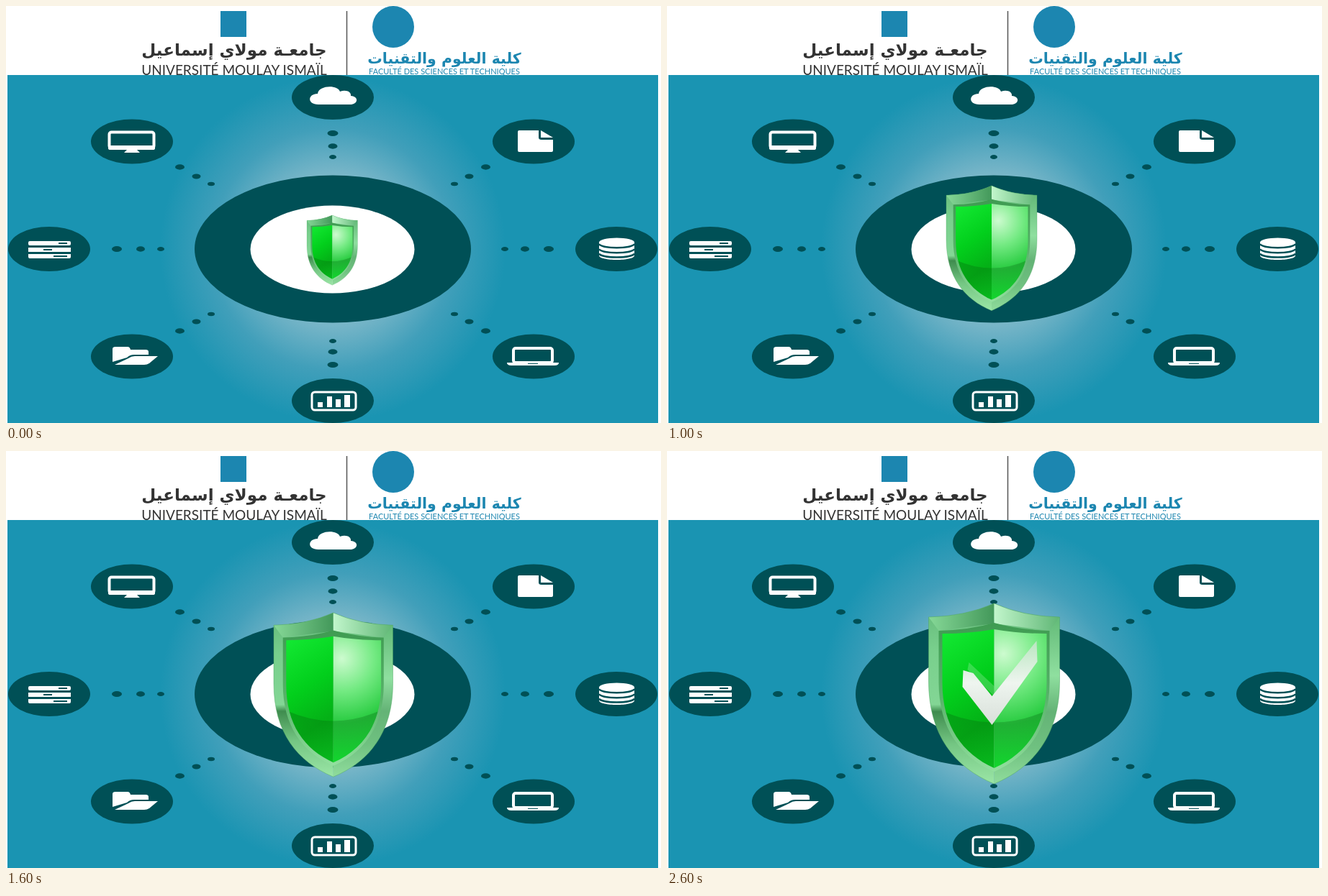
These frames come from a looping animation (910 px wide and 580 px high, 2800 ms). An HTML page:

```html
<!DOCTYPE html>
<html lang="fr">
<head>
<meta charset="utf-8">
<title>Shield</title>
<style>
  html, body { margin: 0; width: 100%; height: 100%; overflow: hidden; background: #fff; }
  svg { display: block; width: 910px; height: 580px; }
  .arabic { font: bold 23px "DejaVu Sans", sans-serif; direction: rtl; text-anchor: middle; }
  .latin { font-family: Lato, sans-serif; text-anchor: middle; }
</style>
</head>
<body>
<svg viewBox="0 0 910 580">
  <defs>
    <radialGradient id="glow" gradientUnits="userSpaceOnUse" cx="454" cy="338" r="240">
      <stop offset=".4" stop-color="#80b9ca"/>
      <stop offset=".7" stop-color="#419fba"/>
      <stop offset="1" stop-color="#1a94b2"/>
    </radialGradient>
    <linearGradient id="rimLeft" x2="0" y2="1">
      <stop offset=".1" stop-color="#6cc181"/>
      <stop offset=".25" stop-color="#78cf8c"/>
      <stop offset=".56" stop-color="#83d695"/>
      <stop offset=".6" stop-color="#3f8c4e"/>
      <stop offset=".78" stop-color="#74c683"/>
      <stop offset="1" stop-color="#9be6a6"/>
    </linearGradient>
    <linearGradient id="rimRight" x2="0" y2="1">
      <stop offset=".1" stop-color="#66bd7b"/>
      <stop offset=".4" stop-color="#8fdf9f"/>
      <stop offset=".6" stop-color="#64b376"/>
      <stop offset=".8" stop-color="#6fc180"/>
      <stop offset="1" stop-color="#90dc9c"/>
    </linearGradient>
    <linearGradient id="browLeft">
      <stop stop-color="#86d897"/>
      <stop offset="1" stop-color="#43985a"/>
    </linearGradient>
    <linearGradient id="browRight">
      <stop stop-color="#c2f6cc"/>
      <stop offset="1" stop-color="#5fb675"/>
    </linearGradient>
    <linearGradient id="bevelFill" x2="0" y2="1">
      <stop stop-color="#3f9b52"/>
      <stop offset=".5" stop-color="#57b269"/>
      <stop offset="1" stop-color="#93e09f"/>
    </linearGradient>
    <linearGradient id="panelLeft" x2=".5" y2="1">
      <stop stop-color="#14ea34"/>
      <stop offset=".4" stop-color="#02cf1c"/>
      <stop offset=".7" stop-color="#04b016"/>
      <stop offset="1" stop-color="#08bc1e"/>
    </linearGradient>
    <radialGradient id="panelRight" gradientUnits="userSpaceOnUse" cx="468" cy="282" r="165">
      <stop stop-color="#cdfbcf"/>
      <stop offset=".3" stop-color="#74ea83"/>
      <stop offset=".6" stop-color="#27cb3f"/>
      <stop offset="1" stop-color="#10da2c"/>
    </radialGradient>
    <linearGradient id="shade" x2="0" y2="1">
      <stop stop-color="#03500a" stop-opacity=".3"/>
      <stop offset=".8" stop-color="#03500a" stop-opacity="0"/>
    </linearGradient>
    <linearGradient id="tickFill" x2="0" y2="1">
      <stop stop-color="#b9e6c0"/>
      <stop offset=".5" stop-color="#eef5ef"/>
      <stop offset="1" stop-color="#d8dfd9"/>
    </linearGradient>
    <clipPath id="leftHalf"><path d="M350 200H455V480H350Z"/></clipPath>
    <clipPath id="rightHalf"><path d="M455 200H560V480H455Z"/></clipPath>
    <path id="rim" d="M364 231Q415 230 455 212Q495 230 546 231V320C546 395 510 440 455 463C400 440 364 395 364 320Z"/>
    <path id="bevel" d="M378 250Q420 249 455 239Q490 249 532 250V322C532 385 502 426 455 446C408 426 378 385 378 322Z"/>
    <path id="panel" d="M383 254Q420 254 455 248Q490 254 528 254V322C528 383 500 421 455 441C411 421 383 383 383 322Z"/>
    <clipPath id="inPanel"><use href="#panel"/></clipPath>
  </defs>

  <rect x="298" y="7" width="36" height="36" fill="#1c86b0"/>
  <circle cx="538" cy="29" r="29" fill="#1c86b0"/>
  <path d="M473.500 7V96" stroke="#555" stroke-width="1.500"/>
  <text class="arabic" x="317" y="69" fill="#333">جامعـة مولاي إسماعيل</text>
  <text class="latin" x="317" y="96" font-size="19" fill="#333">UNIVERSITÉ MOULAY ISMAÏL</text>
  <text class="arabic" x="609" y="80" style="font-size:20.500px" fill="#1c86b0">كلية العلوم والتقنيات</text>
  <text class="latin" x="609" y="95" font-size="11" fill="#1c86b0">FACULTÉ DES SCIENCES ET TECHNIQUES</text>

  <rect x="2" y="96" width="904" height="484" fill="url(#glow)"/>
  <g id="network" fill="#005056">
    <ellipse cx="454" cy="338" rx="192" ry="102.500"/>
    <ellipse cx="453.500" cy="338.500" rx="114" ry="61" fill="#fff"/>
  </g>

  <g id="icons" fill="#fff" stroke="#005056" stroke-width="0">
    <path d="M434 137C418 137 419 122 433 122C434 110 461 109 464 119C472 116 480 119 479 125C491 126 489 137 478 137Z"/>
    <path d="M713 173H740V183Q740 186 744 186H760V201Q760 203 758 203H713Q711 203 711 201V175Q711 173 713 173ZM743 173L760 183H743Z"/>
    <path d="M824 329V347C824 355 873 355 873 347V329Z"/>
    <ellipse cx="848.500" cy="328.500" rx="24.500" ry="6"/>
    <path d="M824 331C828 338 869 338 873 331M824 338C828 345 869 345 873 338M824 344.500C828 351 869 351 873 344.500" fill="none" stroke-width="2.500"/>
    <rect x="705" y="476" width="54" height="20" rx="3" fill="none" stroke="#fff" stroke-width="4"/>
    <path d="M696 496H768Q768 500 762 500H702Q696 500 696 496Z"/>
    <path d="M725 497.500H739" stroke-width="1"/>
    <rect x="425" y="537" width="61" height="25" rx="4" fill="none" stroke="#fff" stroke-width="3"/>
    <path d="M433 551h7v7h-7zM446 543h7v15h-7zM458 547h7v11h-7zM470 541h8v17h-8z"/>
    <path d="M148 495V477Q148 474 152 474H169Q172 474 173 478H194Q198 478 198 481V485H178Q172 485 168 489Z"/>
    <path d="M151 499L170 490Q174 487 179 487H211L199 497Q196 499 192 499Z"/>
    <path d="M33 327H88Q90 327 90 329V331Q90 333 88 333H33Q31 333 31 331V329Q31 327 33 327ZM31 336H90V342H31ZM31 345H90V349Q90 351 88 351H33Q31 351 31 349Z"/>
    <path d="M73 330H85M52 339H64M66 348H85" stroke-width="2"/>
    <rect x="143.500" y="175.500" width="62" height="22" rx="3" fill="none" stroke="#fff" stroke-width="4"/>
    <path d="M142 194H207V198Q207 200 204 200H182L186 204H164L168 200H145Q142 200 142 198Z"/>
  </g>

  <g id="shield">
    <use href="#rim" fill="url(#rimLeft)" clip-path="url(#leftHalf)"/>
    <use href="#rim" fill="url(#rimRight)" clip-path="url(#rightHalf)"/>
    <path d="M364 231Q415 230 455 212V240L378 250Z" fill="url(#browLeft)"/>
    <path d="M546 231Q495 230 455 212V240L532 250Z" fill="url(#browRight)"/>
    <use href="#rim" fill="none" stroke="#4ea562" stroke-opacity=".5"/>
    <use href="#bevel" fill="url(#bevelFill)"/>
    <use href="#panel" fill="url(#panelLeft)" clip-path="url(#leftHalf)"/>
    <use href="#panel" fill="url(#panelRight)" clip-path="url(#rightHalf)"/>
    <path d="M370 355Q455 400 540 355V470H370Z" fill="url(#shade)" clip-path="url(#inPanel)"/>
    <g id="tick">
      <path d="M420 294L455 327V341L418 304Z" fill="#fff" fill-opacity=".2"/>
      <path d="M412 305L426 309L452 341L514 264L515 293L452 381L411 328Z" fill="url(#tickFill)"/>
    </g>
  </g>
</svg>
<script>
  const byId = id => document.getElementById(id);
  const CX = 454, CY = 338;

  // Offsets from the hub: x, y, rx, ry; mirrored into every quadrant.
  const parts = [
    [0, 211, 57, 31], [279, 149.5, 57, 31], [394, 0, 57, 31],
    [0, 161, 7.5, 4], [0, 143, 6.5, 3.7], [0, 128, 5, 3],
    [300, 0, 7, 4], [267, 0, 6, 3.7], [239, 0, 5, 3],
    [212.5, 114, 6.5, 3.7], [189.5, 101, 6, 3.4], [169, 90.5, 5, 2.8]
  ];
  let ellipses = "";
  for (const [x, y, rx, ry] of parts)
    for (const sx of x ? [-1, 1] : [1])
      for (const sy of y ? [-1, 1] : [1])
        ellipses += `<ellipse cx="${CX + sx * x}" cy="${CY + sy * y}" rx="${rx}" ry="${ry}"/>`;
  byId("network").insertAdjacentHTML("beforeend", ellipses);

  // Left, top and width of the shield as it grows.
  const poses = [
    [418, 291, 70.5], [416.5, 286, 80], [409, 276.5, 90.5], [403, 269, 101.5], [397, 260, 114],
    [388, 250, 126], [383.5, 244, 138.5], [380, 231, 154], [372, 225, 165.5], [363.5, 212, 182]
  ];
  const STEP = 200, STEPS = 14, TICK_START = 10;

  function draw(now) {
    const step = Math.floor(now / STEP) % STEPS;
    const [left, top, width] = poses[Math.min(step, poses.length - 1)];
    byId("shield").setAttribute("transform",
      `translate(${left} ${top}) scale(${width / 182}) translate(-364 -212)`);

    const size = step < TICK_START ? 0 : 1 - 0.14 * (STEPS - 1 - step);
    byId("tick").setAttribute("transform",
      `translate(462 324) scale(${size}) translate(-462 -324)`);
    requestAnimationFrame(() => draw(performance.now()));
  }
  draw(performance.now());
</script>
</body>
</html>
```
